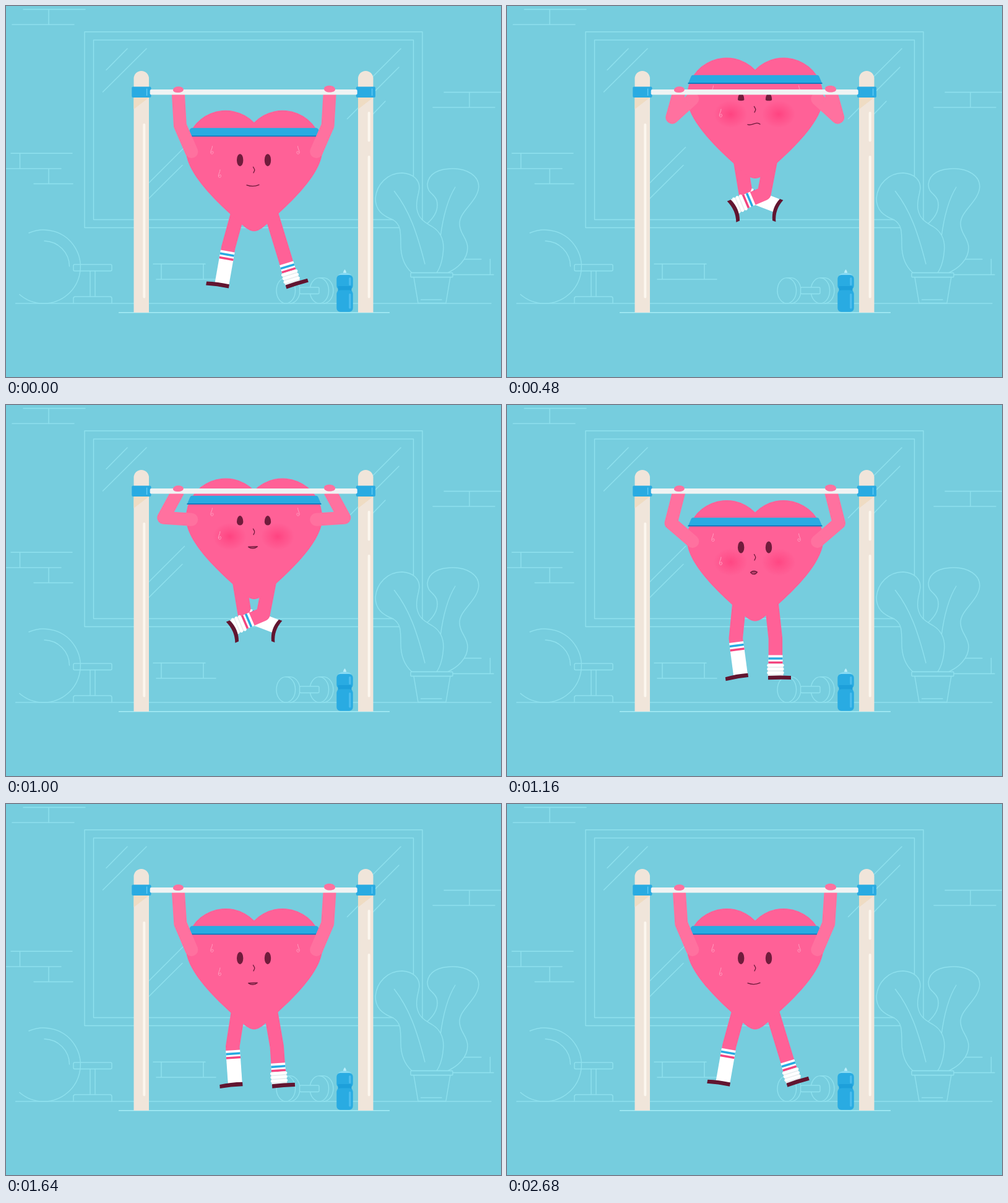
An HTML page for the animation above (2720 ms loop, 800 px wide and 600 px high).

```html
<!DOCTYPE html>
<html lang="en">
<head>
<meta charset="utf-8">
<title>Pull-ups</title>
<style>
html, body { margin: 0; width: 100%; height: 100%; overflow: hidden; background: #76cdde; }
svg { display: block; width: 100vw; height: 100vh; }
.line { fill: none; stroke: #8fe1ee; stroke-width: 1.4; stroke-linecap: round; stroke-linejoin: round; }
.solid { fill: #76cdde; }
.ink { fill: none; stroke: #6b1a3a; stroke-width: 1.3; stroke-linecap: round; stroke-linejoin: round; }
.sweat { fill: none; stroke: #ff9dbf; stroke-width: 1; stroke-linecap: round; }
.arm { fill: none; stroke: #ff719f; stroke-width: 21; stroke-linejoin: round; }
.skin { fill: none; stroke: #ff6197; stroke-width: 22.5; stroke-linejoin: round; }
.shine { stroke: #fcf7ef; stroke-width: 4; stroke-linecap: round; }
</style>
</head>
<body>
<svg viewBox="0 0 800 600" xmlns="http://www.w3.org/2000/svg">
  <defs>
    <radialGradient id="blush">
      <stop offset="0" stop-color="#ff3c7b" stop-opacity=".8"/>
      <stop offset=".4" stop-color="#ff3c7b" stop-opacity=".45"/>
      <stop offset="1" stop-color="#ff3c7b" stop-opacity="0"/>
    </radialGradient>
    <path id="tear" d="M1 -7C1 -3 -2 0 -1.7 3.2C-1.2 6.6 2.6 6 2.5 2.8C2.3 .3 .2 .3 -.2 2.6"/>
  </defs>
  <rect width="800" height="600" fill="#76cdde"/>

  <g class="line">
    <path d="M28 5.5H128M69 5.5V30M10 30H110M8 238.3H107M22.5 238V263M0 263H89M69 263V287.5M45 287.5H108"/>
    <path d="M708 139.5H800M749 139.5V164M690 164H790M238 417.2H322M251 417V442M319 417V442M243 442H339"/>
    <path d="M735 409.5H768M782.5 409.5V434M720 434.5H788"/>
    <rect x="127" y="41.8" width="546" height="316.7"/>
    <rect x="141.5" y="55" width="517" height="290.5"/>
    <path d="M162 103.5L196 69M156.5 139L227 69M638 69L590 117M635 99L551.5 182.5M613 154L590 178M220 297L288.5 228.5M220 322L285 257.5"/>
    <path d="M15.5 481H784"/>
    <path d="M37 367A59.5 59.5 0 1 1 21.8 466.5M62 380A41.5 41.5 0 0 1 102.5 421"/>
    <path d="M136 428.5V470M144 428.5V470M109 480.5V473Q109 470 112 470H168Q171 470 171 473V480.5"/>
    <rect x="109" y="418" width="62" height="10.5" rx="2"/>
    <g id="weight">
      <ellipse cx="452.3" cy="460.3" rx="15.3" ry="20.7"/>
      <path d="M452.3 439.6H459.5C468 440 475 449 475 460.3S468 480.5 459.5 481"/>
    </g>
    <use href="#weight" x="54"/>
    <rect class="solid" x="474.5" y="455" width="31.5" height="10.5" rx="2"/>
    <path class="solid" d="M672 431C668 405 668 368 680.5 352C693 341 700 329 696 314C691 302 681 303 681 288C683 271 699 263 722 263C746 263 764 275 764 292C763 316 733 331 733 352C733 369 746 375 746 391C746 410 730 424 714 431.5Z"/>
    <path d="M726 293C713 314 706 343 702 374"/>
    <path class="solid" d="M656 431.5C643 420 638 405 638 386C638 364 638 354 626 346C608 339 597 330 597 311C599 288 617 270 640 270C658 271 668 281 668 294C667 306 662 314 664 328C667 346 679 351 689 357C702 365 707 377 707 391C706 410 702 423 696 431.5Z"/>
    <path d="M627.5 299.5C652 331 664 366 677 417"/>
    <path class="solid" d="M659 438.5L666 480.5H711L718 438.5Z"/>
    <rect class="solid" x="654" y="431.5" width="68" height="7" rx="1"/>
    <path d="M670.5 475H704"/>
  </g>
  <path d="M182 495.8H620" stroke="#a6edf6" stroke-width="1.6"/>

  <g>
    <path d="M206.5 495.8V117.2A12.2 12.2 0 0 1 231 117.2V495.8Z" fill="#f0e5da"/>
    <path d="M569 495.8V117.2A12.2 12.2 0 0 1 593.5 117.2V495.8Z" fill="#f0e5da"/>
    <path d="M206.5 148H231L206.5 167ZM569 148H593.5L569 167Z" fill="#efdcc3"/>
    <path class="shine" d="M223.3 192V470.5M586.7 173V217.5M586.7 244V470.5"/>
    <rect x="203.3" y="130.5" width="31.2" height="17.4" rx="2" fill="#29abe2"/>
    <rect x="565.8" y="130.5" width="31.2" height="17.4" rx="2" fill="#29abe2"/>
    <path d="M227.6 133.5V145M591.6 133.5V145" stroke="#61caf3" stroke-width="1.5"/>
  </g>

  <g>
    <path d="M545 432C545 429 546.5 427 547.5 426C548.5 427 550 429 550 432Z" fill="#b9eefa"/>
    <path d="M537 436C538 430 557 430 558 436Z" fill="#85d9f2"/>
    <rect x="534.3" y="435" width="26.4" height="23.5" rx="6" fill="#29abe2"/>
    <rect x="536.5" y="453" width="22" height="12" fill="#1d9fda"/>
    <rect x="534.3" y="459.5" width="26.4" height="35.3" rx="6" fill="#29abe2"/>
    <path d="M555.8 440.5V450.5M555.8 466.5V488" stroke="#4dbdee" stroke-width="3.2" stroke-linecap="round"/>
  </g>

  <g id="drops" fill="#9be3ef"></g>
  <g id="legs"></g>
  <g id="body">
    <path fill="#ff6197" d="M401 188.5A64.2 64.2 0 0 1 511.3 233.3C511.3 268 468 311 437 339C420 354 411 364.5 401 364.5C391 364.5 382 354 365 339C334 311 290.7 268 290.7 233.3A64.2 64.2 0 0 1 401 188.5Z"/>
    <path fill="#29abe2" d="M300.5 197.3H501.5Q503.5 197.3 504.5 199.5L509.5 211.3H292.5L297.5 199.5Q298.5 197.3 300.5 197.3Z"/>
    <path d="M292.5 210.5H509.5" stroke="#0b6cb5" stroke-width="1.4"/>
    <g id="face">
      <g id="cheeks" fill="url(#blush)">
        <ellipse cx="361.5" cy="273" rx="27" ry="22"/>
        <ellipse cx="439" cy="273" rx="27" ry="22"/>
      </g>
      <g class="sweat">
        <use href="#tear" x="332.5" y="234"/>
        <use href="#tear" x="345" y="272"/>
        <use href="#tear" transform="translate(472.5 234) scale(-1 1)"/>
      </g>
      <path id="eyes" fill="#701c3c"/>
      <path class="ink" d="M399.5 260.5C400.5 263 402.5 264 401.6 266.5L400 270"/>
      <path id="mouth" class="ink" style="fill:#b8406b"/>
    </g>
  </g>
  <g id="arms"></g>
  <rect x="232.7" y="135" width="335" height="8.6" rx="2" fill="#eff3f3"/>
  <path fill="#ff719f" d="M270 136C270 128.5 286.5 128.5 286.8 135C287 138 283 140 278 140S270 138.5 270 136Z"/>
  <path fill="#ff719f" d="M532 135C532 127 514.5 127 514 133.5C513.8 137.5 518 139.5 523 139.5S532 138 532 135Z"/>
</svg>
<script>
const LOOP = 2720, STEP = 40;
const $ = id => document.getElementById(id);
const rad = deg => deg * Math.PI / 180;

function set(el, attrs) {
  for (const k in attrs) el.setAttribute(k, attrs[k]);
  return el;
}

function make(tag, attrs, parent) {
  const el = document.createElementNS('http://www.w3.org/2000/svg', tag);
  return parent.appendChild(set(el, attrs));
}

function smooth(t, a, b) {
  const u = Math.min(1, Math.max(0, (t - a) / (b - a)));
  return u * u * (3 - 2 * u);
}

// Eases in from a to b and out again from c to d.
const pulse = (t, a, b, c, d) => smooth(t, a, b) - smooth(t, c, d);

const riseAt = t => 95 * pulse(t, -14, 600, 715, 1310);

function buildLeg(side) {
  const g = make('g', {}, $('legs'));
  const skin = make('path', { class: 'skin' }, g);
  const shin = make('g', {}, g);
  const end = side < 0 ? 53 : 34;
  const band = (y, height, fill, width = 23, rx = 0) =>
    make('rect', { x: -width / 2, y, width, height, fill, rx }, shin);
  band(0, end, '#fff');
  band(3.8, 3.6, '#29abe2');
  band(10.3, 3.6, '#f4447f');
  if (side > 0) {
    band(14, 20, '#e9eef0', 25);
    for (let y = 14.5; y < 32; y += 6) band(y, 4.2, '#fff', 27.5, 2);
  }
  return { skin, shin, shoe: make('path', { fill: '#621530' }, shin), side, end };
}

function poseLeg(leg, hipX, hipY, length, thigh, shin, calf, scale) {
  const kx = hipX - length * Math.sin(rad(thigh)), ky = hipY + length * Math.cos(rad(thigh));
  const dx = -Math.sin(rad(shin)), dy = Math.cos(rad(shin));
  const sx = kx + dx * calf, sy = ky + dy * calf;
  set(leg.skin, { d: `M${hipX} ${hipY}L${kx} ${ky}L${sx + dx} ${sy + dy}` });
  set(leg.shin, { transform: `translate(${sx} ${sy}) rotate(${shin}) scale(1 ${scale})` });
  const bend = 1 + Math.max(0, Math.abs(shin) - 40) / 4;
  const s = leg.side, y = leg.end - .5, toe = s < 0 ? y + 1.6 : y;
  set(leg.shoe, { d: `M${-12 * s} ${y}Q${7 * s} ${y - bend} ${25 * s} ${toe}`
    + `V${toe + 6.2}Q${7 * s} ${y + 6.6 - bend} ${-12 * s} ${y + 6.4}Z` });
}

function poseLegs(t, dy) {
  const tuck = pulse(t, 0, 465, 1010, 1180);
  const kick = 1 - smooth(t, 0, 430) + smooth(t, 2360, 2690);
  const sway = pulse(t, 1010, 1360, 1380, 1960);
  const spread = kick + sway, trail = kick + .4 * sway;
  const y = 330 + dy, length = 63 - 3 * tuck;
  poseLeg(legL, 376, y, length, 15.4 * spread - 9.5 * tuck,
    18 * trail - 8 - 61 * tuck, 6, 1 - .08 * tuck);
  poseLeg(legR, 427, y, length, 11 * tuck - 17 * spread,
    67 * tuck - 17 * trail, 27 - 7 * tuck * tuck, 1);
}

const mirror = x => 801.5 - x;
const arms = [x => x, mirror].map(flip => ({
  flip,
  limb: make('path', { class: 'arm' }, $('arms')),
  shoulder: make('circle', { r: 10.5, fill: '#ff719f' }, $('arms'))
}));

// Two-bone arm from hand to shoulder; the bones foreshorten near the top.
function poseArms(rise) {
  const p = rise / 95, hx = 278.2, hy = 139.3, sx = 299.8, sy = 235.7 - rise;
  const upper = 54.2 - 5 * p - 9 * p * p, fore = 46 - 1.6 * p;
  const dx = sx - hx, dy = sy - hy, d = Math.hypot(dx, dy);
  const along = (upper * upper - fore * fore + d * d) / (2 * d);
  const out = Math.sqrt(Math.max(0, upper * upper - along * along));
  const ex = hx + (dx * along - dy * out) / d, ey = hy + (dy * along + dx * out) / d;
  for (const { flip, limb, shoulder } of arms) {
    set(limb, { d: `M${flip(hx)} ${hy}L${flip(ex)} ${ey}L${flip(sx)} ${sy}` });
    set(shoulder, { cx: flip(sx), cy: sy });
  }
}

function poseFace(t) {
  const squint = pulse(t, 0, 240, 800, 1240);
  const lid = 1 - .9 * Math.max(0, 1 - Math.abs(t - 1820) / 100);
  const top = 10 * lid, low = (10 - 8 * squint) * lid;
  set($('eyes'), { d: [378.2, 423].map(x =>
    `M${x - 5.2} 249.3a5.2 ${top} 0 0 1 10.4 0a5.2 ${low} 0 0 1 -10.4 0Z`).join('') });

  const strain = pulse(t, 0, 560, 720, 1000);
  const open = pulse(t, 700, 1320, 1400, 1880);
  const w = 10 - 5.5 * open;
  const x = f => 399 + f * w;
  const lips = v => [292 + v + strain, 292 + v - 9 * strain];
  const [u1, u2] = lips(-6 * open), [b1, b2] = lips(2 * open);
  set($('mouth'), { d: `M${x(-1)} 289.7C${x(-.4)} ${u1} ${x(.4)} ${u2} ${x(1)} 289.2`
    + `C${x(.4)} ${b2} ${x(-.4)} ${b1} ${x(-1)} 289.7Z` });

  set($('cheeks'), { opacity: pulse(t, 0, 240, 1040, 1600) });
  set($('face'), { transform: `translate(0 ${-.16 * riseAt(t - 45)})` });
}

const drops = [[400.5, 120], [416, 100], [382.5, 708]].map(([cx, from]) =>
  ({ from, el: make('ellipse', { cx, rx: 1.5 }, $('drops')) }));

function poseDrops(t) {
  for (const { from, el } of drops) {
    const age = Math.max(0, t - from), cy = 358 + .00345 * age * age;
    const ry = cy > 465 ? 1.5 : 1.5 + age / 55;
    set(el, { cy, ry, visibility: age && cy < 479 ? 'visible' : 'hidden' });
  }
}

const legL = buildLeg(-1), legR = buildLeg(1);

function draw(t) {
  const rise = riseAt(t);
  const sag = 1.6 * pulse(t, 1300, 1420, 1420, 1640);
  const dy = sag - rise;
  set($('body'), { transform: `translate(0 ${dy})` });
  poseFace(t);
  poseArms(rise);
  poseLegs(t, dy);
  poseDrops(t);
}

const start = performance.now();
function tick() {
  const t = (performance.now() - start) % LOOP;
  draw(Math.floor(t / STEP) * STEP);
  requestAnimationFrame(tick);
}
tick();
</script>
</body>
</html>
```
